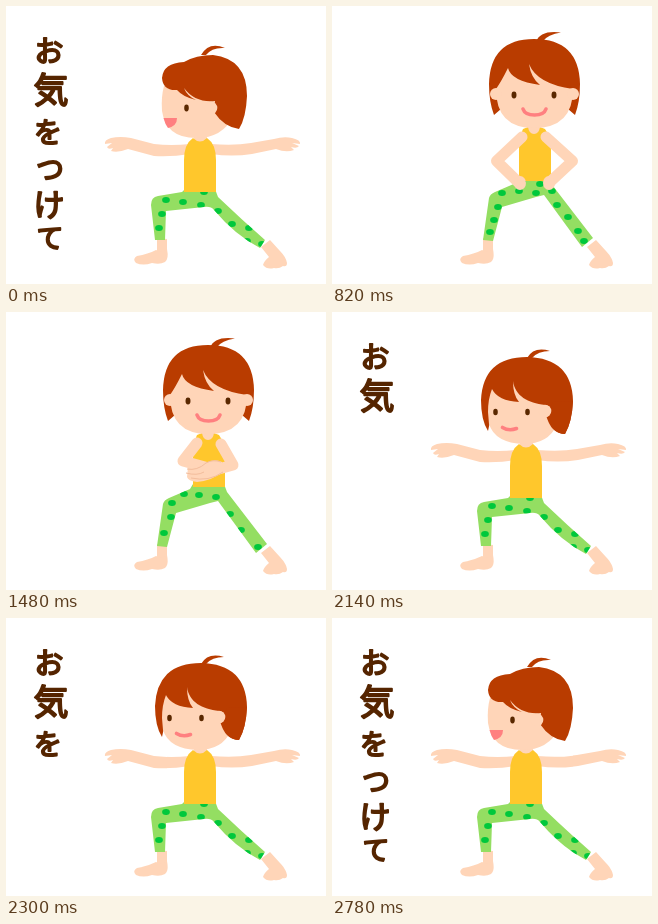
Recreate the animation shown at these times as an HTML page. Size 320 by 278 pixels, loop 2.94 s.

```html
<!DOCTYPE html>
<html lang="ja">
<meta charset="utf-8">
<title>お気をつけて</title>
<style>
html, body { margin: 0; width: 100%; height: 100%; overflow: hidden; background: #fff }
svg { display: block; width: 100vw; height: 100vh }
.skin { fill: #ffd5b8 }
.hair { fill: #b93c00 }
.shirt { fill: #ffc72c }
.pants { fill: #94de62 }
.dots { fill: #00c83c }
.eye { fill: #5a2800 }
.pink { fill: #ff8080 }
.smile { fill: none; stroke: #ff8080; stroke-width: 3.6; stroke-linecap: round }
.limb { fill: none; stroke: #ffd5b8; stroke-width: 11; stroke-linejoin: round; stroke-linecap: round }
.line { fill: none; stroke: #f3bd9c; stroke-width: 1 }
text {
  font-family: "Noto Sans CJK JP", "Noto Sans CJK", sans-serif; font-weight: 300; text-anchor: middle;
  fill: #552500; stroke: #552500; stroke-width: 1.9; stroke-linejoin: round
}
</style>
<svg viewBox="0 0 320 278">
  <g id="words"></g>

  <!-- feet -->
  <g class="skin">
    <path id="ankle" d="M151 232L161 233L161 246L151 249Z"/>
    <path d="M150 244Q156 247 161 243Q163 253 159 256Q154 259 146 257Q137 260 130 257Q126 253 131 250Q142 248 150 244Z"/>
    <path d="M255 241L264 234L274 245Q280 251 281 257Q281 261 277 260Q273 263 268 262Q261 264 257 259Q258 255 263 251Z"/>
  </g>

  <!-- trousers -->
  <g id="legsWide">
    <path class="pants" d="M197 165H227L229 174L266 230L256 237L214 182H207L170 239L159 231L195 174Z"/>
  </g>
  <g id="legsBent">
    <path class="pants" d="M187 172H218L221 180L261 232L250 241L212 189L204 191L170 201L161 235L151 234L157 192Q158 188 163 186L184 177Z"/>
  </g>
  <g id="legsLunge">
    <path class="pants" d="M179 183H209L212 191Q235 213 259 234L254 242Q229 229 208 204Q205 200 198 201L160 205L159 234H149L145 199Q145 191 152 190L176 186Z"/>
  </g>

  <!-- facing forward -->
  <g id="front">
    <path class="skin" d="M205 106H217V115L222 118L214 125H208L200 118L205 115Z"/>
    <path class="shirt" d="M200 114L205 112Q206 119 211 119Q216 119 217 112L222 114Q228 122 228 135V166H196V135Q196 122 200 114Z"/>
    <g id="armsHip">
      <path class="limb" d="M199 122L173.500 146L195 167M223 122L249.500 146L227 167"/>
      <ellipse class="skin" cx="197" cy="168" rx="6" ry="7"/>
      <ellipse class="skin" cx="226" cy="168" rx="6" ry="7"/>
    </g>
    <g id="armsFold">
      <path class="limb" d="M200 122L186 140L208 146"/>
      <path class="limb" d="M224 123L236 144L200 154"/>
      <path class="skin" d="M191 146Q200 149 209 142Q217 137 225 141L228 150Q214 160 200 161Q191 160 190 156Z"/>
      <path class="line" d="M189 152Q200 155 207 151M190 148Q200 150 209 142Q216 138 224 141M194 157Q212 161 226 151"/>
    </g>
    <path class="hair" d="M213 27Q217 15 238 17.500Q225 19 219 27Z"/>
    <path class="hair" d="M171 100Q166 87 166 69Q167 24 211 24Q256 24 257 69Q257 87 252 100L245 94L178 94Z"/>
    <path class="skin" d="M173 74Q178 67 185 53Q188 66 217 70Q208 63 206 49Q214 69 250 74Q250 113 211 113Q173 113 173 74Z"/>
    <circle class="skin" cx="173" cy="79" r="6"/>
    <circle class="skin" cx="250" cy="79" r="6"/>
    <ellipse class="eye" cx="191" cy="80" rx="2.500" ry="3.400"/>
    <ellipse class="eye" cx="231" cy="80" rx="2.500" ry="3.400"/>
    <path class="smile" d="M200 94Q202 100 211.500 100Q221 100 223 94"/>
  </g>

  <!-- arms spread -->
  <g id="spread">
    <path class="skin" d="M184 138Q165 140 148 138L125 132Q114 130 105 132Q98 134 99 138L106 137L101 141Q102 144 107 142L105 145Q112 147 122 143L148 150Q166 151 184 148Z"/>
    <path class="skin" d="M205 138Q228 140 245 137L268 133Q278 130 286 132Q295 134 294 138L286 137L293 140Q291 143 285 141L288 144Q280 147 270 143L246 148Q226 151 205 148Z"/>
    <path class="skin" d="M188 125H201V139H188Z"/>
    <path class="shirt" d="M178 186V154Q178 138 187 132Q194 139 201 132Q210 138 210 154V186Z"/>
  </g>
  <g id="turned">
    <path class="hair" d="M195 46Q202 34 218 39Q206 39 200 46Z"/>
    <path class="hair" d="M156 119Q149 108 149 88Q151 45 195 45Q240 46 241 89Q240 110 233 122Q222 122 214 107L159 105Z"/>
    <path class="skin" d="M156 100Q156 87 160 77Q166 89 187 90Q181 83 181 69C183 84 196 91 213 93Q224 95 225 113Q216 132 192 132Q163 131 157 112Z"/>
    <path class="hair" d="M241 89Q240 110 233 122Q219 122 214 103L221 90Z"/>
    <circle class="skin" cx="213" cy="99" r="6.300"/>
    <ellipse class="eye" cx="163.500" cy="100" rx="2.300" ry="3.300"/>
    <ellipse class="eye" cx="195.500" cy="100" rx="2.300" ry="3.300"/>
    <path class="smile" d="M170.500 115.500Q177 119.500 184.500 116.500"/>
  </g>
  <g id="profile">
    <path class="hair" d="M195 49Q203 35 219 42Q206 41 200 49Z"/>
    <path class="skin" d="M158 80Q155 91 156 105Q160 132 190 132Q217 132 227 110L210 80Z"/>
    <path class="hair" d="M156 72Q157 57 178 56Q190 49 207 49Q241 53 241 90Q240 112 233 123Q218 121 208 106L209 95Q189 97 178 82Q181 90 190 94Q177 91 171 84Q157 85 156 72Z"/>
    <circle class="skin" cx="205" cy="102" r="6.300"/>
    <ellipse class="eye" cx="180.500" cy="102" rx="2.300" ry="3.400"/>
    <path class="pink" d="M157.500 112H171Q171 120 162 122Q159 118 157.500 112Z"/>
  </g>
</svg>
<script>
const $ = id => document.getElementById(id);
const add = (parent, tag, attrs) => {
  const el = document.createElementNS('http://www.w3.org/2000/svg', tag);
  for (const k in attrs) el.setAttribute(k, attrs[k]);
  return parent.appendChild(el);
};

// Spots on a pair of trousers, as x,y pairs, cut off at its outline
const spots = (legs, pairs) => {
  const clip = legs.id + 'Clip';
  if (!$(clip)) add(legs, 'clipPath', { id: clip }).append(legs.querySelector('path').cloneNode());
  const g = add(legs, 'g', { class: 'dots', 'clip-path': `url(#${clip})` });
  for (const pair of pairs.split(' ')) {
    const [cx, cy] = pair.split(',');
    add(g, 'ellipse', { cx, cy, rx: 3.9, ry: 3 });
  }
  return g;
};
spots($('legsWide'), '206,171 196,183 187,197 178,211 172,224 202,185 222,183 229,195 235,209 243,222 254,231');
const spotsHip = spots($('legsBent'), '190,176 208,178 187,185 170,187 204,187 166,201 162,214 158,226 220,185 225,199 236,211 246,225 252,235');
const spotsFold = spots($('legsBent'), '178,182 193,183 210,185 166,191 165,205 158,221 224,202 235,218 252,235');
spots($('legsLunge'), '160,194 156,208 153,222 177,196 195,199 198,186 212,205 226,218 243,222 241,235 256,238');

// Character, centre x, centre y, size
const letters = [
  ['お', 43, 45, 29], ['気', 45, 84, 35], ['を', 42, 126, 28],
  ['つ', 44, 163, 28], ['け', 43, 198, 31], ['て', 44, 232, 27]
].map(([char, x, y, size]) => {
  const el = add($('words'), 'text', { x, y: y + size * 0.38, 'font-size': size });
  el.textContent = char;
  return el;
});

const show = (el, on) => el.style.display = on ? '' : 'none';
const LOOP = 2940, TYPE_START = 1980, TYPE_STEP = 160;

function draw(now) {
  const t = now % LOOP;
  const front = t >= 160 && t < TYPE_START;
  const wide = front && t < 820;
  const fold = front && t >= 1480;
  const typed = t < 160 ? 6 : front ? 0 : Math.floor((t - TYPE_START) / TYPE_STEP) + 1;

  show($('front'), front);
  $('front').setAttribute('transform', wide ? '' : 'translate(-9 9)');
  show($('armsHip'), !fold);
  show($('armsFold'), fold);
  show($('legsWide'), wide);
  show($('legsBent'), front && !wide);
  show(spotsHip, !fold);
  show(spotsFold, fold);
  $('ankle').setAttribute('d', wide
    ? 'M160 231L171 238L161 250L150 247Z'
    : 'M151 232L161 233L161 246L151 249Z');

  show($('spread'), !front);
  show($('legsLunge'), !front);
  show($('turned'), !front && typed < 4);
  show($('profile'), !front && typed >= 4);
  letters.forEach((el, i) => show(el, i < typed));
}

const start = performance.now();
function tick() {
  draw(performance.now() - start);
  requestAnimationFrame(tick);
}
tick();
</script>
</html>
```
